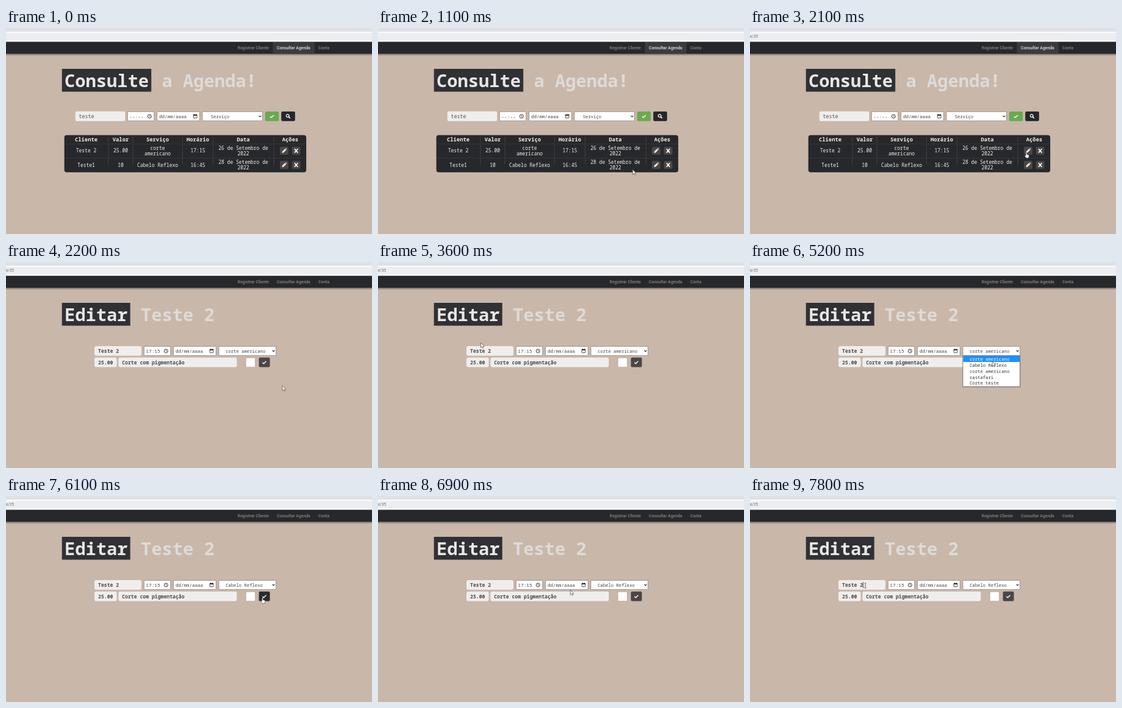
Recreate the animation shown at these times as an HTML page. Size 600 px wide and 338 px high, loop 8 s.

```html
<!DOCTYPE html>
<html lang="pt">
<head>
<meta charset="utf-8">
<title>Agenda</title>
<style>
  html, body { margin: 0; width: 100%; height: 100%; overflow: hidden; background: #c9b7a9; }
  svg { display: block; width: 100vw; height: 100vh; }
  text { font-family: "Noto Sans Mono", "DejaVu Sans Mono", monospace; white-space: pre; }
  .nav { font: 700 6.8px Roboto, sans-serif; }
  .url { font: 6.3px Roboto, sans-serif; }
</style>
</head>
<body>
<svg id="stage" viewBox="0 0 600 338" xmlns="http://www.w3.org/2000/svg"></svg>
<script>
const LOOP = 8000, STEP = 100;
const DARK = '#27282b', FIELD = '#f0eeed', BUTTON = '#4a4645';

const rect = (x, y, w, h, fill, r = 0, extra = '') =>
  `<rect x="${x}" y="${y}" width="${w}" height="${h}" rx="${r}" fill="${fill}" ${extra}/>`;
const text = (s, x, y, size, fill, weight = 400, extra = '') =>
  `<text x="${x}" y="${y}" font-size="${size}" fill="${fill}" font-weight="${weight}" ${extra}>${s}</text>`;
const centered = (s, x, y, size, weight) =>
  text(s, x, y, size, '#f0efee', weight, 'text-anchor="middle"');
const stroke = (d, color, width) =>
  `<path d="${d}" fill="none" stroke="${color}" stroke-width="${width}"/>`;
const at = (x, y, body) => `<g transform="translate(${x} ${y})">${body}</g>`;
const group = (id, body) => `<g id="${id}">${body}</g>`;

const box = (x, y, w) => rect(x, y, w, 15, '#fff', 0.5, 'stroke="#8d8681" stroke-width=".8"');
const check = (x, y) => at(x, y, stroke('M-3 0L-1 2L3-2', '#fff', 1.4));
const chevron = (x, y) => at(x, y, stroke('M-1.9-1L0 1L1.9-1', '#222', 1.1));

function timeInput(x, y, value) {
  return box(x, y, 43.5) + text(value, x + 3, y + 10.4, 7.8, '#444') +
    at(x + 36, y + 7.6, '<circle r="3" fill="none" stroke="#222" stroke-width=".9"/>' +
      stroke('M0-1.9V.2L1.4 1', '#222', 0.7));
}

function dateInput(x, y) {
  return box(x, y, 69.8) + text('dd/mm/aaaa', x + 3.4, y + 10.4, 7.5, '#444') +
    at(x + 62.5, y + 7.5, rect(-2.8, -2.5, 5.6, 5.4, 'none', 0.4, 'stroke="#222" stroke-width=".8"') +
      rect(-3, -2.8, 6, 1.8, '#222') + stroke('M-1.7-3.5V-2M1.7-3.5V-2', '#222', 0.8));
}

function select(x, y, w, label, id) {
  return box(x, y, w) + chevron(x + w - 4, y + 7.5) +
    text(label, x + (id ? 11 : 13.7), y + 10.3, 7.25, '#444', 400, id ? `id="${id}"` : '');
}

function heading(boxed, rest, id) {
  const advance = 17.25, w = boxed.length * advance + 8.5;
  return rect(91.7, 67, w, 37.5, '#303135') +
    text(boxed, 96, 97, 28.75, '#e9e7e6', 700) +
    text(rest, 91.7 + w + advance, 97, 28.75, '#dedbd9', 700);
}

function rowButtons(y) {
  const pencil = '<path d="M-3.5 3.5L-3 1L1-3L3 -1L-1 3Z M1.6-3.4L2.3-4Q3-4.2 4-3T3.9-2.2L3.4-1.6Z" fill="#fff"/>';
  return rect(449, y, 14, 13.3, BUTTON, 2) + at(456, y + 6.7, pencil) +
    rect(468.7, y, 14, 13.3, BUTTON, 2) +
    at(475.7, y + 6.7, stroke('M-2.7-3.2L2.7 3.2M2.7-3.2L-2.7 3.2', '#fff', 1.7));
}

const columns = [131.5, 188, 248.5, 314.5, 389, 466];
const dividers = [167.8, 208, 289.3, 339.7, 439.3];

function tableRow(y, cells) {
  return cells.map((cell, i) => {
    const lines = cell.split('|');
    return lines.map((s, n) =>
      centered(s, columns[i], y + (lines.length > 1 ? n * 9 - 4.3 : 0), 8, 500)).join('');
  }).join('') + rowButtons(y - 9.6);
}

function listPage() {
  const heads = ['Cliente', 'Valor', 'Serviço', 'Horário', 'Data', 'Ações'];
  return rect(437.5, 23, 68.3, 19.3, '#3b3b3d') +
    text('Consultar Agenda', 444, 34.7, 6.8, '#cfcdcb', 700, 'class="nav"') +
    heading('Consulte', 'a Agenda!') +
    rect(113.7, 136.8, 81.6, 16, FIELD, 2) + text('teste', 119.6, 147.6, 8.3, '#555') +
    timeInput(199.3, 137.3, '--:--') + dateInput(247.7, 137.3) + select(322, 137.3, 98.5, 'Serviço') +
    rect(424.8, 137, 22.4, 15.8, '#6aaa50', 2) + check(436, 145) +
    rect(451.3, 137, 22.6, 15.8, '#252629', 2) +
    at(462.3, 144.6, '<circle cx="-.6" cy="-.6" r="2.3" fill="none" stroke="#fff" stroke-width="1.3"/>' +
      stroke('M1 1L3.5 3.5', '#fff', 1.5)) +
    rect(95.6, 175.7, 396.6, 61, DARK, 4) +
    stroke('M96 190.3H492M96 213.5H492', '#38393c', 0.8) +
    stroke(dividers.map(x => `M${x} 178.5V189M${x} 191.5V212.5M${x} 214.5V224`).join(''), '#4b4b4d', 0.8) +
    heads.map((s, i) => centered(s, columns[i], 186, 8.8, 700)).join('') +
    tableRow(204.3, ['Teste 2', '25.00', 'corte|americano', '17:15', '26 de Setembro de|2022']) +
    tableRow(227.6, ['Teste1', '10', 'Cabelo Reflexo', '16:45', '28 de Setembro de|2022']);
}

const options = ['corte americano', 'Cabelo Reflexo', 'corte americano', 'rastafari', 'Corte teste'];

function editPage() {
  return text('Consultar Agenda', 444, 34.7, 6.8, '#7d7975', 700, 'class="nav"') +
    heading('Editar', 'Teste 2') +
    rect(145, 138, 77, 15.8, FIELD, 3) + text('Teste 2', 151, 148.7, 8.15, '#4a4a4a', 600) +
    timeInput(226.3, 138.4, '17:15') + dateInput(274.5, 138.4) +
    select(349, 138.4, 93.6, '', 'choice') +
    rect(145, 156.8, 36.6, 15.8, FIELD, 3) + text('25.00', 151, 167.6, 8.15, '#4a4a4a', 600) +
    rect(184.4, 156.8, 194, 15.8, FIELD, 3) + text('Corte com pigmentação', 190.2, 167.6, 8.15, '#4a4a4a', 600) +
    rect(393.3, 157.2, 15.2, 15.2, '#fff', 1.5, 'stroke="#b7aaa0" stroke-width=".7"') +
    rect(414.6, 156.8, 18, 15.8, BUTTON, 2, 'id="save"') + check(423.5, 164.7) +
    group('caret', rect(184.9, 141.3, 0.8, 9.6, '#222')) +
    group('menu',
      rect(348, 154, 96, 52, '#000', 1, 'opacity=".14"') +
      rect(349, 153.6, 93.6, 50.8, '#fff', 0, 'stroke="#77716d" stroke-width=".8"') +
      rect(349.4, 154, 92.8, 10, '#1e90ff', 0, 'id="mark"') +
      options.map((s, i) => text(s, 360, 162 + i * 9.85, 7.25, '#333', 400, 'class="option"')).join(''));
}

const stage = document.getElementById('stage');
stage.innerHTML =
  '<defs><linearGradient id="shade" x2="0" y2="1"><stop stop-opacity=".4"/><stop offset="1" stop-opacity="0"/></linearGradient></defs>' +
  rect(0, 0, 600, 338, '#c9b7a9') + rect(0, 0, 600, 6, '#dee1e6') + rect(0, 6, 600, 17, '#fbfbfc') +
  rect(-10, 8, 620, 12, '#eceef2') +
  text('e/35', 0, 16.4, 6.3, '#6b6e72', 400, 'id="url" class="url"') +
  rect(0, 42, 600, 4, 'url(#shade)') + rect(0, 22.6, 600, 19.7, DARK) +
  text('Registrar Cliente', 379.8, 34.7, 6.8, '#7d7975', 700, 'class="nav"') +
  text('Conta', 512, 34.7, 6.8, '#7d7975', 700, 'class="nav"') +
  group('list', listPage()) + group('edit', editPage()) +
  group('pointer',
    group('arrow', '<path d="M0 0V8L1.9 6.4L3.2 9L4.6 8.4L3.4 5.8H5.9Z" fill="#f4f2f1" stroke="#55504e" stroke-width=".7"/>') +
    group('hand', '<path d="M-.9 5.5V.6Q0-.6 .9 .6V3.4L3.8 4.2Q4.6 4.6 4.4 6L3.6 9.3H-.4L-2.8 5.7Q-2.5 4.6-.9 5.5Z" fill="#fff" stroke="#333" stroke-width=".6"/>') +
    group('beam', stroke('M-1.6-4H-.4L0-3.6L.4-4H1.6M0-3.6V3.6M-1.6 4H-.4L0 3.6L.4 4H1.6', '#444', 0.8)));

const el = id => document.getElementById(id);
const show = (id, on) => { el(id).style.display = on ? '' : 'none'; };
const optionTexts = document.querySelectorAll('.option');

// Pointer stops: time, x, y
const path = [
  [600, 580, 311], [900, 490, 262], [1200, 392, 222], [1400, 435, 207],
  [1700, 453, 204], [2100, 453, 204], [2200, 453, 203], [2400, 453, 203],
  [2800, 270, 165], [3100, 88, 110], [3300, 172, 120], [3600, 168.5, 132.5],
  [3800, 230, 150], [4200, 388, 190], [4500, 396, 147], [4900, 396, 147],
  [5200, 397, 163], [5500, 394, 168], [5800, 394, 168], [6100, 420.5, 167],
  [6400, 420.5, 167], [6800, 330, 155], [7300, 188, 147], [7500, 182, 146], [7700, 189, 147]
];

function pointerAt(t) {
  const i = path.findIndex(p => p[0] > t);
  if (i < 0) return path[path.length - 1].slice(1);
  if (i === 0) return path[0].slice(1);
  const [t0, x0, y0] = path[i - 1], [t1, x1, y1] = path[i];
  const k = (t - t0) / (t1 - t0), e = k * k * (3 - 2 * k);
  return [x0 + (x1 - x0) * e, y0 + (y1 - y0) * e];
}

const inside = (x, y, [l, top, r, b]) => x >= l && x <= r && y >= top && y <= b;
const fields = [[145, 138, 222, 154], [145, 157, 181, 172.6], [184, 157, 378, 172.6]];
const editButton = [449, 195, 463, 208], saveButton = [414.6, 157, 432.6, 172.6];

function draw(t) {
  const editing = t >= 2200, open = t >= 4700 && t < 5600;
  const [x, y] = pointerAt(t);
  const overButton = inside(x, y, editing ? saveButton : editButton);
  const overField = editing && !open && fields.some(f => inside(x, y, f));

  show('url', t >= 2000);
  show('list', !editing);
  show('edit', editing);
  show('menu', open);
  show('caret', t >= 7600);
  el('choice').textContent = options[t < 5600 ? 0 : 1];
  el('save').setAttribute('fill', overButton ? '#2b2b2d' : BUTTON);

  const marked = t < 5300 ? 0 : 1;
  el('mark').setAttribute('y', 154 + marked * 9.85);
  optionTexts.forEach((o, i) => o.setAttribute('fill', i === marked ? '#fff' : '#333'));

  show('pointer', t >= 600);
  show('hand', overButton);
  show('beam', overField);
  show('arrow', !overButton && !overField);
  el('pointer').setAttribute('transform', `translate(${x} ${y})`);
}

const start = performance.now();
function tick() {
  const t = (performance.now() - start) % LOOP;
  draw(Math.floor(t / STEP) * STEP);
  requestAnimationFrame(tick);
}
tick();
</script>
</body>
</html>
```
